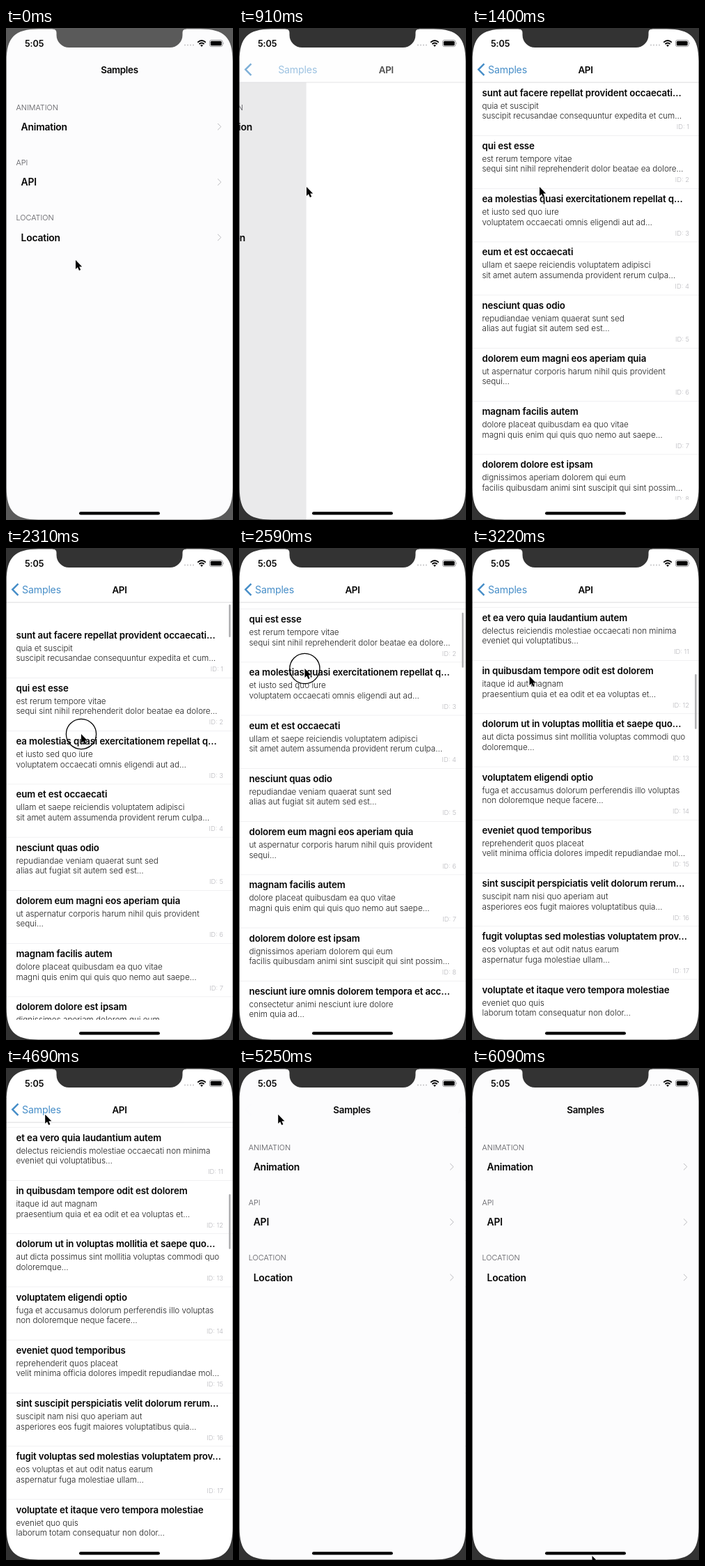
An HTML page for the animation above (6.16 s loop, 326 px wide and 706 px high).

```html
<!DOCTYPE html>
<html lang="en">
<head>
<meta charset="utf-8">
<title>List demo</title>
<style>
  html, body { margin: 0; width: 100%; height: 100%; overflow: hidden; background: #333; }
  svg { display: block; width: 326px; height: 706px; }
  text { font-family: Inter, Roboto, "Liberation Sans", sans-serif; fill: #050505; white-space: pre; }
  .nav { font-size: 13.4px; font-weight: 600; letter-spacing: -.3px; text-anchor: middle; }
  .back { font-size: 14.2px; letter-spacing: -.2px; fill: #478ec8; }
  .clock { font-size: 12.6px; font-weight: 600; letter-spacing: -.1px; }
  .section { font-size: 10.8px; font-weight: 300; fill: #55555a; }
  .item { font-size: 13.9px; font-weight: 600; letter-spacing: -.2px; }
  .head { font-size: 13.3px; font-weight: 600; letter-spacing: -.13px; }
  .body { font-size: 11.7px; font-weight: 300; letter-spacing: -.01px; fill: #1c1c1c; }
  .id { font-size: 9.4px; font-weight: 300; fill: #b9b9be; text-anchor: end; }
</style>
</head>
<body>
<svg viewBox="0 0 326 706">
  <defs>
    <clipPath id="listArea"><rect y="78" width="326" height="599"/></clipPath>
  </defs>

  <rect width="326" height="706" fill="#fcfcfd"/>
  <g id="home"></g>
  <rect id="dim" width="326" height="706" fill="#000"/>

  <g id="page">
    <rect y="78" width="326" height="628" fill="#fff"/>
    <g clip-path="url(#listArea)"><g id="rows"></g></g>
    <rect id="bar" x="320" width="2.6" rx="1.3" fill="#b2b2b4"/>
  </g>

  <rect width="326" height="78" fill="#fcfcfd"/>
  <g id="navBg">
    <rect width="326" height="78" fill="#fff"/>
    <rect y="77.6" width="326" height=".9" fill="#d8d8da"/>
  </g>
  <text id="homeTitle" class="nav" y="64.7">Samples</text>
  <text id="pageTitle" class="nav" y="64.7">API</text>
  <text id="backLabel" class="back" y="64.7">Samples</text>
  <path id="backArrow" d="M17.5 51.3L9.3 59.6L17.5 67.9" fill="none" stroke="#478ec8" stroke-width="2.5"/>

  <text class="clock" x="27" y="26.5">5:05</text>
  <g fill="#c2c2c4">
    <circle cx="257" cy="24.5" r="1"/><circle cx="261" cy="24.5" r="1"/>
    <circle cx="265" cy="24.5" r="1"/><circle cx="269" cy="24.5" r="1"/>
  </g>
  <g fill="none" stroke="#000" stroke-width="1.9">
    <path d="M275.2 20.6Q281 15.6 286.8 20.6"/>
    <path d="M277.4 23Q281 19.9 284.6 23"/>
  </g>
  <path d="M281 27L279 24.8Q281 23.2 283 24.8Z"/>
  <rect x="292.4" y="17.4" width="18.6" height="9.2" rx="2.6" fill="none" stroke="#8e8e90" stroke-width=".9"/>
  <rect x="293.8" y="18.8" width="15.8" height="6.4" rx="1.5"/>
  <path d="M312.2 20.4Q313.6 22 312.2 23.6Z" fill="#8e8e90"/>
  <rect x="105" y="694.3" width="116" height="4.2" rx="2.1"/>

  <g id="bezel">
    <path fill-rule="evenodd" d="M0 0H326V706H0Z
      M46.7 1.5H279.5c34.1 0 46 11.9 46 46V659.5c0 34.1-11.9 46-46 46H46.7c-34.1 0-46-11.9-46-46V47.5c0-34.1 11.9-46 46-46Z"/>
    <path d="M67 0V1.5Q72.5 1.5 72.5 7V10A18 18 0 0 0 90.5 28H235.5A18 18 0 0 0 253.5 10V7Q253.5 1.5 259 1.5V0Z"/>
  </g>

  <circle id="touch" r="21.6" fill="none" stroke="#000" stroke-width="1.3"/>
  <path id="cursor" d="M0 0V12.9L2.9 10.2L5 15L7.2 14.1L5.2 9.4H9.2Z" stroke="#fff" stroke-width=".9" paint-order="stroke"/>
</svg>

<script>
const LOOP = 6160, STEP = 70, PITCH = 76.25;
const LIST_READY = 1400, ACTIVE = 700;

const posts = [
  'sunt aut facere repellat provident occaecati…|quia et suscipit|suscipit recusandae consequuntur expedita et cum…',
  'qui est esse|est rerum tempore vitae|sequi sint nihil reprehenderit dolor beatae ea dolore…',
  'ea molestias quasi exercitationem repellat q…|et iusto sed quo iure|voluptatem occaecati omnis eligendi aut ad…',
  'eum et est occaecati|ullam et saepe reiciendis voluptatem adipisci|sit amet autem assumenda provident rerum culpa…',
  'nesciunt quas odio|repudiandae veniam quaerat sunt sed|alias aut fugiat sit autem sed est…',
  'dolorem eum magni eos aperiam quia|ut aspernatur corporis harum nihil quis provident|sequi…',
  'magnam facilis autem|dolore placeat quibusdam ea quo vitae|magni quis enim qui quis quo nemo aut saepe…',
  'dolorem dolore est ipsam|dignissimos aperiam dolorem qui eum|facilis quibusdam animi sint suscipit qui sint possim…',
  'nesciunt iure omnis dolorem tempora et acc…|consectetur animi nesciunt iure dolore|enim quia ad…',
  'optio molestias id quia eum|quo et expedita modi cum officia vel magni|doloribus qui repudiandae…',
  'et ea vero quia laudantium autem|delectus reiciendis molestiae occaecati non minima|eveniet qui voluptatibus…',
  'in quibusdam tempore odit est dolorem|itaque id aut magnam|praesentium quia et ea odit et ea voluptas et…',
  'dolorum ut in voluptas mollitia et saepe quo…|aut dicta possimus sint mollitia voluptas commodi quo|doloremque…',
  'voluptatem eligendi optio|fuga et accusamus dolorum perferendis illo voluptas|non doloremque neque facere…',
  'eveniet quod temporibus|reprehenderit quos placeat|velit minima officia dolores impedit repudiandae mol…',
  'sint suscipit perspiciatis velit dolorum rerum…|suscipit nam nisi quo aperiam aut|asperiores eos fugit maiores voluptatibus quia…',
  'fugit voluptas sed molestias voluptatem prov…|eos voluptas et aut odit natus earum|aspernatur fuga molestiae ullam…',
  'voluptate et itaque vero tempora molestiae|eveniet quo quis|laborum totam consequatur non dolor…'
];

const linear = x => x;
const smooth = x => x * x * (3 - 2 * x);
const speedUp = x => x * x;
const slowDown = x => 1 - (1 - x) ** 3;

// time, x, y, easing towards this point
const path = [
  [0, 100, 333],
  [700, 97, 228, smooth],
  [1860, 97, 228, linear],
  [2310, 108, 267, smooth],
  [2450, 108, 267, linear],
  [2640, 83, 94, speedUp],
  [2900, 83, 94, linear],
  [3200, 82.5, 184, smooth],
  [3640, 82.5, 184, linear],
  [4690, 56.2, 66.8, smooth],
  [5460, 56.2, 66.8, linear],
  [6090, 172.5, 700, smooth]
];
const touches = [[700, 840], [1890, 2660], [3290, 3570], [4970, 5110]];

const $ = id => document.getElementById(id);
const ratio = (t, a, b) => Math.min(1, Math.max(0, (t - a) / (b - a)));
const mix = (a, b, k) => a + (b - a) * k;

function add(parent, tag, attrs, text) {
  const el = document.createElementNS('http://www.w3.org/2000/svg', tag);
  for (const k in attrs) el.setAttribute(k, attrs[k]);
  if (text) el.textContent = text;
  parent.append(el);
}

const move = (id, x, y = 0) => $(id).setAttribute('transform', `translate(${x} ${y})`);
const fade = (id, v) => $(id).setAttribute('opacity', v);

['Animation', 'API', 'Location'].forEach((name, i) => {
  const y = 79.4 * i, home = $('home');
  add(home, 'text', { class: 'section', x: 14.5, y: 117.5 + y }, name.toUpperCase());
  add(home, 'text', { class: 'item', x: 21.5, y: 146.8 + y }, name);
  add(home, 'path', { d: `M304 ${137 + y}l4.8 4.7l-4.8 4.7`, fill: 'none', stroke: '#bcbcc0' });
});

posts.forEach((post, i) => {
  const [head, a, b] = post.split('|'), y = PITCH * i, rows = $('rows');
  add(rows, 'text', { class: 'head', x: 14.5, y: 97.7 + y }, head);
  add(rows, 'text', { class: 'body', x: 14.5, y: 115.7 + y }, a);
  add(rows, 'text', { class: 'body', x: 14.5, y: 130.2 + y }, b);
  add(rows, 'text', { class: 'id', x: 312, y: 145.2 + y }, `ID: ${i + 1}`);
  add(rows, 'rect', { x: 0, y: 154 + y, width: 326, height: .8, fill: '#ededef' });
});

function cursorAt(t) {
  const i = path.findIndex(p => p[0] > t);
  if (i < 0) return path[path.length - 1].slice(1);
  const [t0, x0, y0] = path[i - 1], [t1, x1, y1, ease] = path[i];
  const k = ease(ratio(t, t0, t1));
  return [mix(x0, x1, k), mix(y0, y1, k)];
}

// pull down, flick, then friction until a tap stops the list
function scrollAt(t) {
  if (t < 2450) return -32 * smooth(ratio(t, 1860, 2310));
  if (t < 2640) return mix(-32, 150, speedUp(ratio(t, 2450, 2640)));
  return 475 + 557 * (1 - Math.exp(-.002 * (Math.min(t, 3220) - 2870)));
}

function draw(t) {
  const open = slowDown(ratio(t, 770, 1190)) - slowDown(ratio(t, 4970, 5320));
  const scroll = scrollAt(t), [x, y] = cursorAt(t);

  move('home', -98 * open);
  fade('dim', .1 * open);
  move('page', 326 * (1 - open));
  fade('navBg', open);
  move('homeTitle', mix(163, 51, open));
  fade('homeTitle', Math.max(0, 1 - 1.6 * open));
  move('pageTitle', mix(326, 163, open));
  fade('pageTitle', open);
  move('backLabel', mix(135, 23, open));
  fade('backLabel', Math.max(0, 1.6 * open - .6));
  fade('backArrow', open);

  fade('rows', t >= LIST_READY ? 1 : 0);
  move('rows', 0, -scroll);
  fade('bar', t >= 1890 ? 1 : 0);
  $('bar').setAttribute('y', scroll < 0 ? 81 : 84.2 + .128 * scroll);
  $('bar').setAttribute('height', 79 + Math.min(0, scroll));

  $('bezel').setAttribute('fill', t < ACTIVE ? '#5a5a5a' : '#333');
  move('cursor', x, y);
  move('touch', x, y);
  fade('touch', touches.some(([a, b]) => t >= a && t < b) ? 1 : 0);
}

const start = performance.now();
function tick() {
  const t = (performance.now() - start) % LOOP;
  draw(Math.floor(t / STEP) * STEP);
  requestAnimationFrame(tick);
}
tick();
</script>
</body>
</html>
```
